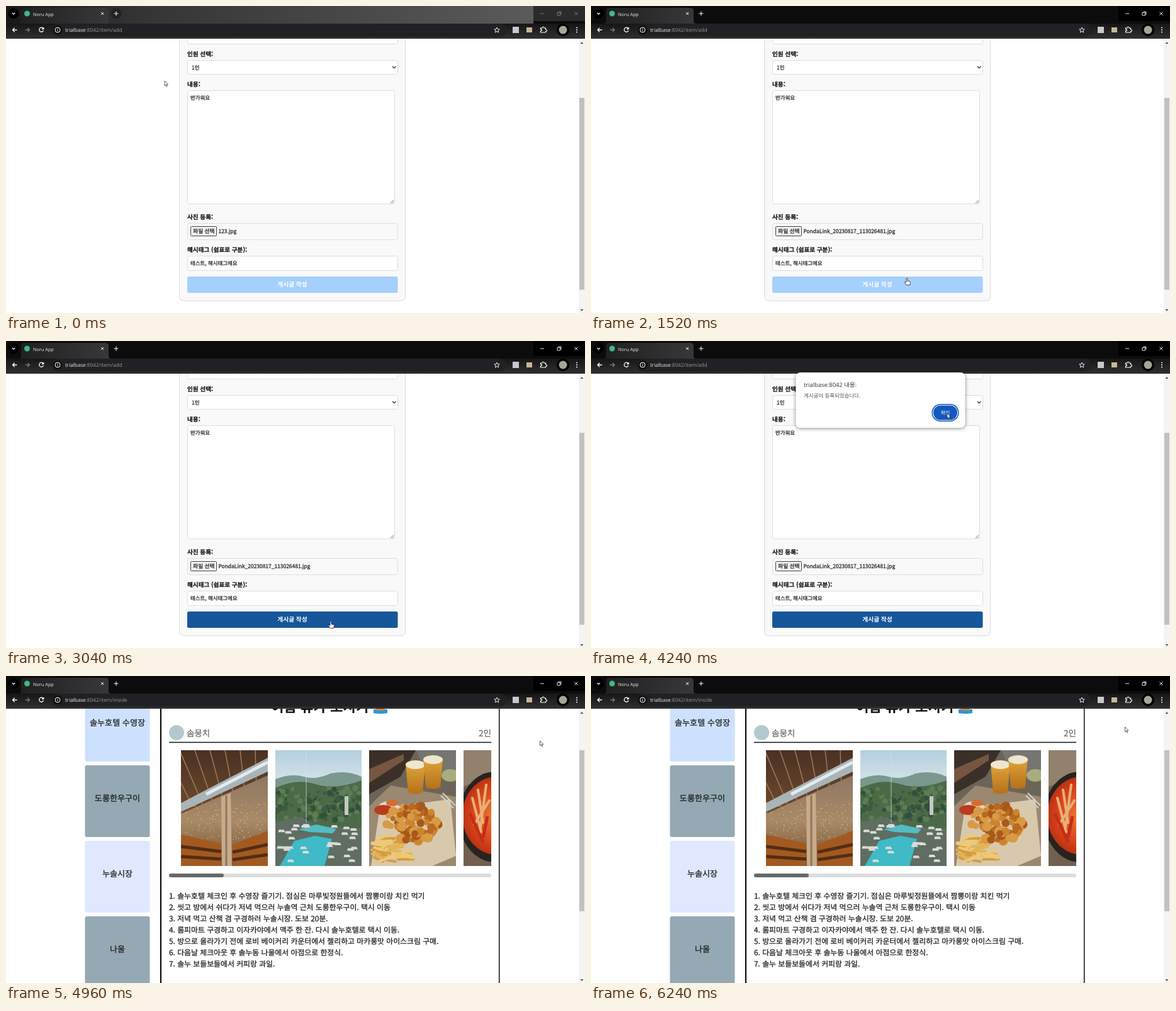
Recreate the animation shown at these times as an HTML page. Size 920 by 488 pixels, loop 6400 ms.

```html
<!DOCTYPE html>
<html lang="ko">
<head>
<meta charset="utf-8">
<title>Noru App</title>
<style>
html, body { margin: 0; width: 100%; height: 100%; overflow: hidden; background: #fff; }
svg { display: block; }
#stage { width: 920px; height: 488px; }
text { font-family: "Noto Sans CJK KR", "Noto Sans CJK", "Noto Sans", sans-serif; font-size: 8.45px; fill: #1c1c1c; text-rendering: geometricPrecision; white-space: pre; }
.ui { font-family: "Open Sans", "Noto Sans CJK KR", sans-serif; }
.med text, text.med { stroke: #1c1c1c; stroke-width: .25px; }
.label { font-size: 9.6px; font-weight: 700; }
.place { font-size: 13.1px; font-weight: 500; text-anchor: middle; }
.line { font-size: 11.87px; font-weight: 500; }
.head { font-size: 13.5px; fill: #666; stroke: #666; stroke-width: .2px; }
.field { fill: #fff; stroke: #ddd; }
.icon { fill: none; stroke: #fff; stroke-width: 1.3; }
#dialog rect.box { filter: drop-shadow(0 1px 3px #0007); }
</style>
</head>
<body>
<svg id="stage" viewBox="0 0 920 488">
  <defs>
    <linearGradient id="idle"><stop stop-color="#191919"/><stop offset=".25" stop-color="#343434"/><stop offset="1" stop-color="#5a5a5a"/></linearGradient>
    <linearGradient id="tab"><stop stop-color="#202020"/><stop offset="1" stop-color="#383838"/></linearGradient>
    <linearGradient id="bar" x2="0" y2="1"><stop stop-color="#161616"/><stop offset="1" stop-color="#303030"/></linearGradient>
    <linearGradient id="ceiling" x2="0" y2="1"><stop stop-color="#4a3122"/><stop offset=".45" stop-color="#69472d"/><stop offset="1" stop-color="#8b5f37"/></linearGradient>
    <linearGradient id="curtain" x2="0" y2="1"><stop stop-color="#8d7763"/><stop offset=".5" stop-color="#a98a66"/><stop offset="1" stop-color="#74502f"/></linearGradient>
    <linearGradient id="sky" x2="0" y2="1"><stop stop-color="#b3cfde"/><stop offset="1" stop-color="#dbe6ea"/></linearGradient>
    <linearGradient id="beer" x2="0" y2="1"><stop stop-color="#e0a53a"/><stop offset="1" stop-color="#b5701a"/></linearGradient>
    <radialGradient id="soup"><stop stop-color="#ec8038"/><stop offset=".6" stop-color="#dd4a1c"/><stop offset="1" stop-color="#bd3212"/></radialGradient>
  </defs>

  <g id="form" class="med">
    <rect x="275.5" y="30.5" width="359" height="438" rx="6" fill="#f9f9f9" stroke="#ddd"/>
    <rect class="field" x="288.5" y="38.5" width="334" height="22" rx="3"/>
    <text class="label" x="288" y="80">인원 선택:</text>
    <rect class="field" x="288.5" y="86.5" width="334" height="22" rx="3"/>
    <text x="295" y="101">1인</text>
    <path d="M614 96l2.7 2.7 2.7-2.7" fill="none" stroke="#222" stroke-width="1.2"/>
    <text class="label" x="288" y="128">내용:</text>
    <rect class="field" x="288.5" y="134.5" width="329" height="180" rx="3"/>
    <text x="293" y="149">반가워요</text>
    <path d="M611 313.5l5-5m-2 5l2-2" stroke="#555" stroke-width=".9"/>
    <text class="label" x="288" y="338.5">사진 등록:</text>
    <rect class="field" x="288.5" y="345.5" width="334" height="26" rx="3" style="fill:#f9f9f9"/>
    <rect x="293.5" y="350.5" width="41" height="15" rx="1" fill="#efefef" stroke="#444"/>
    <text x="297.3" y="361" style="font-size:8.6px;font-weight:500">파일 선택</text>
    <text id="file" x="337.5" y="361"></text>
    <text class="label" x="288" y="390.5">해시태그 (쉼표로 구분):</text>
    <rect class="field" x="288.5" y="397.5" width="334" height="23" rx="3"/>
    <text x="293" y="412">테스트, 해시태그에요</text>
    <rect id="send" x="288" y="430" width="334.5" height="26" rx="2.5"/>
    <text x="455" y="446.2" text-anchor="middle" style="font-size:9.7px;font-weight:700;fill:#fff;stroke:none">게시글 작성</text>
  </g>

  <g id="detail">
    <g id="places" class="med"></g>
    <path d="M246 52V488" stroke="#000" stroke-width="2"/>
    <path d="M783.7 52V488" stroke="#000" stroke-width="1.4"/>
    <text x="421" y="57" style="font-size:22.2px;font-weight:700;fill:#111">여름 휴가 모시기</text>
    <path d="M584 53h22v6q-11 2-22 0z" fill="#3095cf"/>
    <path d="M586 50h17l-2 5h-12z" fill="#c98a4b"/>
    <circle cx="271" cy="90" r="12" fill="#b4c8cf"/>
    <text class="head" x="287" y="96">솜뭉치</text>
    <text class="head" x="771" y="96" text-anchor="end">2인</text>
    <path d="M259 105.5H771" stroke="#111" stroke-width="1.5"/>

    <svg x="278" y="118" width="138" height="184">
      <rect width="138" height="184" fill="url(#ceiling)"/>
      <g id="slats" stroke="#a07a55" stroke-width="1.5"></g>
      <path d="M0 101L138 40V184H0z" fill="url(#curtain)"/>
      <path d="M0 84L138 12V34L0 98z" fill="#a9b4b8"/>
      <path d="M40 70L138 19" stroke="#e3ebee" stroke-width="5"/>
      <g id="lights" fill="#dcc39a"></g>
      <path d="M64 74l15-6 2 116H65z" fill="#c6ab8c"/>
      <path d="M72 72V184" stroke="#947555" stroke-width="3"/>
      <path d="M0 134l64 14v36H0zM82 150l56-22v56H82z" fill="#a3591f"/>
      <path d="M0 153l64 8M0 169l64 4M82 162l56-12M82 174l56-8" stroke="#522d15" stroke-width="5"/>
    </svg>

    <svg x="428" y="118" width="137" height="184">
      <rect width="137" height="60" fill="url(#sky)"/>
      <path d="M0 46q25-10 45-4t42-5q28-6 50 5V90H0z" fill="#7b988f"/>
      <path d="M0 60q34-16 64-6t73-6V184H0z" fill="#4c6a48"/>
      <g id="trees"></g>
      <path d="M110 73h6v30h-6z" fill="#c3c9c0"/>
      <path d="M0 114l42-8 25 16 70 2v60H0z" fill="#5f6d63"/>
      <path d="M7 184l23-40 33-8 27 5-12 43z" fill="#3fbac6"/>
      <path d="M37 126l28-8 32 7-6 7-37-2z" fill="#53bcc4"/>
      <g id="huts" fill="#d9dcd5"></g>
      <path d="M49 0V115" stroke="#d5e2e2" opacity=".7"/>
    </svg>

    <svg x="577" y="118" width="138" height="184">
      <rect width="138" height="184" fill="#6c6557"/>
      <path d="M0 0h74L50 42 0 70z" fill="#3b3028"/>
      <path d="M0 30l55-24v10L0 52z" fill="#765641"/>
      <path d="M75 0h63v38L94 44z" fill="#77756f"/>
      <path d="M0 89l34-33 104 18v110H0z" fill="#9b8871"/>
      <path d="M17 92l112-14 9 90-38 16H3z" fill="#d8c9ad"/>
      <path d="M114 72l20 20m-17-24l20 20" stroke="#d4d3ca" stroke-width="2"/>
      <ellipse cx="129" cy="40" rx="14" ry="10" fill="#a9ac7d"/>
      <g id="mugs"></g>
      <ellipse cx="31" cy="90" rx="16" ry="9" fill="#ddd5c6"/>
      <ellipse cx="23" cy="95" rx="15" ry="8" fill="#b93c1c"/>
      <ellipse cx="37" cy="84" rx="10" ry="5" fill="#d66c31"/>
      <g id="fries" stroke-width="4" stroke-linecap="round"></g>
      <g id="chicken"></g>
    </svg>

    <svg x="727" y="118" width="44" height="184">
      <rect width="44" height="184" fill="#71604f"/>
      <path d="M0 0h44v40L0 58z" fill="#92816c"/>
      <ellipse cx="50" cy="106" rx="58" ry="72" fill="#282321"/>
      <ellipse cx="52" cy="104" rx="54" ry="62" fill="url(#soup)"/>
      <path d="M14 76l14 54M23 63l8 52M36 55l-10 75M17 118l24-38" stroke="#e7b078" stroke-width="4" stroke-linecap="round"/>
      <path d="M10 100l21 46M38 105l-7 34" stroke="#c42e16" stroke-width="5"/>
    </svg>

    <rect x="259" y="314" width="512" height="6" rx="3" fill="#ddd"/>
    <rect x="259" y="314" width="87" height="6" rx="3" fill="#686868"/>
    <g id="lines" class="med"></g>
  </g>

  <rect x="910" y="52" width="10" height="436" fill="#f4f4f4"/>
  <rect id="thumb" x="911" width="8" fill="#c1c1c1"/>
  <path d="M912.5 60l2.5-3 2.5 3z" fill="#555"/>
  <path d="M912.5 482l2.5 3 2.5-3z" fill="#555"/>

  <g id="browser">
    <rect width="920" height="28" fill="#0c0c0c"/>
    <rect id="inactive" width="838" height="28" fill="url(#idle)"/>
    <rect id="caption" x="838" width="82" height="24"/>
    <circle cx="12" cy="12" r="8.5" fill="#000"/>
    <path class="icon" d="M9.8 11l2.2 2.2 2.2-2.2"/>
    <path d="M20 28q4 0 4-4V8q0-5 5-5h129q5 0 5 5v16q0 4 4 4z" fill="url(#tab)"/>
    <circle cx="33.5" cy="12" r="4.5" fill="#41b883"/>
    <text class="ui" x="43" y="15.5" style="font-size:7.3px;fill:#eee">Noru App</text>
    <path class="icon" d="M151.2 10l4 4m0-4l-4 4" style="stroke-width:1"/>
    <circle id="plus" cx="175" cy="12" r="8.5" fill="#222"/>
    <path class="icon" d="M171.5 12h7m-3.5-3.5v7" style="stroke-width:1"/>
    <path id="winIcons" class="icon" d="M849 12h6M876 10.5h4.5v4.5H876zm1.5-1.5h4.5v4.5M903.5 9.5l5 5m0-5l-5 5" style="stroke-width:.9"/>
    <rect y="28" width="920" height="24" fill="url(#bar)"/>
    <rect x="73" y="28" width="722" height="20.5" rx="10" fill="#202124"/>
    <path class="icon" d="M17.5 38H10.5m3.2-3.2L10.5 38l3.2 3.2"/>
    <path class="icon" d="M30.5 38h7m-3.2-3.2l3.2 3.2-3.2 3.2" style="stroke:#777"/>
    <path class="icon" d="M59.3 36a3.5 3.5 0 1 0 .2 3M59.7 34v2.6H57"/>
    <circle cx="82" cy="38" r="7.5" fill="#111"/>
    <circle class="icon" cx="82" cy="38" r="4" style="stroke-width:1"/>
    <path class="icon" d="M82 37.5v2.5m0-4.3v1" style="stroke-width:1"/>
    <text class="ui" x="94" y="41" style="font-size:8.1px;fill:#eee">trialbase<tspan id="path" fill="#999"></tspan></text>
    <path class="icon" d="M780 34l1.2 2.8 3 .2-2.3 2 .7 3-2.6-1.6-2.6 1.6.7-3-2.3-2 3-.2z" style="stroke-width:.9"/>
    <rect x="805" y="33" width="10" height="10" fill="#c9c9c9"/>
    <rect x="827" y="34" width="9" height="8" fill="#c8b795"/>
    <path class="icon" d="M849.5 35h2.5q0-2 1.500-2t1.500 2h2.500v2.500q2 0 2 1.500t-2 1.500V42h-8v-2.500q2 0 2-1.300t-2-1.300z" style="stroke-width:1.2"/>
    <circle cx="885" cy="38" r="10" fill="#000"/>
    <circle cx="885" cy="38" r="6.5" fill="#a4a79b"/>
    <g fill="#eee"><circle cx="907" cy="34.5" r="1.1"/><circle cx="907" cy="38" r="1.1"/><circle cx="907" cy="41.5" r="1.1"/></g>
  </g>

  <g id="dialog">
    <rect class="box" x="325.5" y="50" width="269" height="88" rx="7" fill="#fff"/>
    <text class="ui" x="338" y="73" style="font-size:9.4px;fill:#333">trialbase:8042 내용:</text>
    <text x="338" y="90" style="fill:#555">게시글이 등록되었습니다.</text>
    <rect id="ring" x="542.2" y="100.7" width="41.6" height="26.6" rx="13.3" fill="#fff" stroke="#1558bd" stroke-width="1.5"/>
    <rect x="544" y="102.5" width="38" height="23" rx="11.5" fill="#1558bd"/>
    <text x="563" y="117" text-anchor="middle" style="font-size:8px;fill:#e8f0ff">확인</text>
  </g>

  <g id="cursor" fill="#fff" stroke="#222" stroke-width=".8" stroke-linejoin="round">
    <path id="arrow" transform="scale(.88)" d="M0 0V8.8L2 7l1.4 3.2 1.5-.7L3.5 6.4H6.2z"/>
    <path id="hand" d="M-1 1Q0-.5 1 1V5l3.5 1q1 .3.9 1.5L4.8 11.5H-.8L-3.6 7.5q-.2-1.5 1-1L-1 7.5z"/>
  </g>
</svg>

<script>
const $ = id => document.getElementById(id);
const add = (id, html) => { $(id).innerHTML += html; };
const repeat = (n, make) => Array.from({ length: n }, (_, i) => make(i)).join("");

let seed = 7;
const rnd = (a, b) => {
  seed = seed * 16807 % 2147483647;
  return +(a + (b - a) * seed / 2147483647).toFixed(2);
};
const pick = list => list[Math.floor(rnd(0, list.length - .01))];

["솔누호텔 수영장", "도롱한우구이", "누솔시장", "나울"].forEach((name, i) => {
  const y = 22 + i * 120, color = ["#cde1fe", "#94a9b3", "#dfe8ff", "#94a9b3"][i];
  add("places", `<rect x="125.500" y="${y}" width="103" height="114" rx="3" fill="${color}"/>
    <text class="place" x="177" y="${y + 56.5}">${name}</text>`);
});

[
  "솔누호텔 체크인 후 수영장 즐기기. 점심은 마루빛정원뜰에서 짬뽕이랑 치킨 먹기",
  "씻고 방에서 쉬다가 저녁 먹으러 누솔역 근처 도롱한우구이. 택시 이동",
  "저녁 먹고 산책 겸 구경하러 누솔시장. 도보 20분.",
  "롬피마트 구경하고 이자카야에서 맥주 한 잔. 다시 솔누호텔로 택시 이동.",
  "방으로 올라가기 전에 로비 베이커리 카운터에서 젤리하고 마카롱맛 아이스크림 구매.",
  "다음날 체크아웃 후 솔누동 나울에서 아점으로 한정식.",
  "솔누 보들보들에서 커피랑 과일."
].forEach((s, i) => add("lines", `<text class="line" x="259" y="${354.3 + i * 18}">${i + 1}. ${s}</text>`));

// Photo details
add("slats", repeat(8, i => `<path d="M${i * 24 - 50} 0L${i * 17 + 2} 90"/>`));
add("lights", repeat(160, () => `<circle cx="${rnd(0, 138)}" cy="${rnd(84, 145)}" r=".7"/>`));
add("trees", repeat(150, () =>
  `<circle cx="${rnd(0, 137)}" cy="${rnd(60, 112)}" r="${rnd(2, 5)}" fill="${pick(["#3c5a3e", "#486b40", "#5d7d55", "#30503a"])}"/>`));
add("huts", repeat(30, i =>
  `<path d="M${i % 2 ? rnd(78, 126) : rnd(0, 48)} ${rnd(116, 176)}h8l2 4h-11z"/>`));
add("mugs", [58, 86].map((x, i) => `<g transform="translate(${x} ${i ? 8 : 16})">
  <path d="M14 14q12-1 9 13-2 9-11 9" fill="none" stroke="#c4b795" stroke-width="3"/>
  <path d="M0 5h31l-4 46q-12 5-23 0z" fill="url(#beer)"/>
  <ellipse cx="15.500" cy="7" rx="15.500" ry="7" fill="#efe6ce"/></g>`).join(""));
add("fries", repeat(40, () =>
  `<path d="M${rnd(3, 48)} ${rnd(140, 177)}l${rnd(12, 28)} ${rnd(-9, 8)}" stroke="${pick(["#e1b456", "#d69c3c", "#edc978"])}"/>`));
add("chicken", repeat(90, () => {
  const a = rnd(0, 6.28), r = Math.sqrt(rnd(0, 1));
  return `<circle cx="${(68 + 42 * r * Math.cos(a)).toFixed(1)}" cy="${(117 + 31 * r * Math.sin(a)).toFixed(1)}"
    r="${rnd(4, 8)}" fill="${pick(["#b96a1f", "#cd842f", "#a8591a", "#d89a45"])}"/>`;
}));

// Pointer stops: time, x, y
const stops = [
  [0, 252, 119], [320, 252, 119], [960, 470, 440], [1520, 502, 432], [1680, 502, 432],
  [2160, 516, 445], [3760, 516, 445], [4160, 566, 115], [4320, 566, 115],
  [4480, 848.5, 103], [5200, 848.5, 103], [5280, 848.5, 81], [6400, 848.5, 81]
];
const LOOP = 6400, STEP = 80;
const mix = (a, b, k) => a + (b - a) * k;
const clamp = k => Math.max(0, Math.min(1, k));
const show = (id, on) => { $(id).style.display = on ? "" : "none"; };
const set = (id, attrs) => { for (const k in attrs) $(id).setAttribute(k, attrs[k]); };

function pointer(t) {
  const i = stops.findIndex(s => s[0] > t);
  const [t0, x0, y0] = stops[i - 1], [t1, x1, y1] = stops[i];
  const k = (t - t0) / (t1 - t0), e = k * k * (3 - 2 * k);
  return [mix(x0, x1, e), mix(y0, y1, e)];
}

function draw(t) {
  const active = t >= 1040, posted = t >= 4320, hand = active && t < 3600;
  show("form", !posted);
  show("detail", posted);
  show("inactive", !active);
  show("plus", !active);
  set("caption", { fill: active ? "#000" : "#2b2b2b" });
  set("winIcons", { opacity: active ? 1 : .4 });
  set("thumb", posted ? { y: 118, height: 256 } : { y: 146, height: 305 });
  $("path").textContent = ":8042/item/" + (posted ? "inside" : "add");
  $("file").textContent = active ? "PondaLink_20230817_113026481.jpg" : "123.jpg";

  const k = clamp((t - 1680) / 400);
  const rgb = [[165, 207, 253], [22, 86, 155]];
  set("send", { fill: `rgb(${rgb[0].map((c, i) => Math.round(mix(c, rgb[1][i], k)))})` });

  show("dialog", t >= 3360 && t < 4400);
  show("ring", !posted);
  set("dialog", { transform: `translate(0 ${posted ? -4.5 : 0})`, opacity: posted ? .9 : 1 });

  show("hand", hand);
  show("arrow", !hand);
  set("cursor", { transform: `translate(${pointer(t)})` });
}

function tick() {
  draw(Math.floor(performance.now() % LOOP / STEP) * STEP);
  requestAnimationFrame(tick);
}
tick();
</script>
</body>
</html>
```
